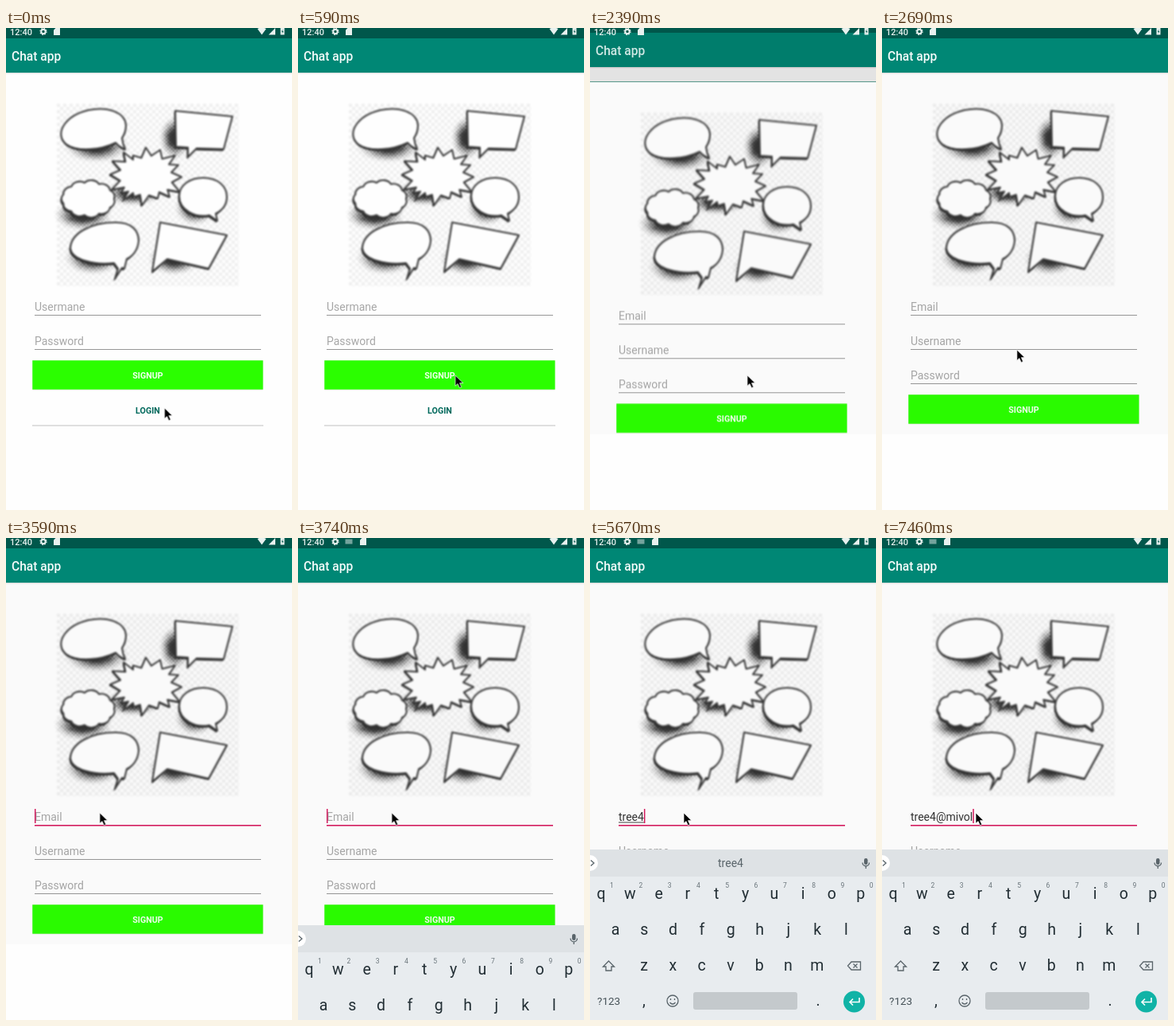
These frames come from a looping animation (360x605 px, 8000 ms). An HTML page:

```html
<!DOCTYPE html>
<html lang="en">
<head>
<meta charset="utf-8">
<title>Chat app</title>
<style>
  html, body { margin: 0; width: 100%; height: 100%; overflow: hidden; background: #fff; }
  svg { display: block; width: 360px; height: 605px; font: 14px Roboto, sans-serif; }
  .mid { text-anchor: middle; }
  .button { font-size: 10.7px; font-weight: 600; text-anchor: middle; }
  .hint { fill: #a8a8a8; }
  .key { font-size: 19.5px; text-anchor: middle; fill: #222e34; }
  .num { font-size: 8.5px; text-anchor: middle; fill: #69747a; }
  .line { fill: none; stroke: #59646a; stroke-width: 1.3; }
  #content { mix-blend-mode: multiply; }
  #picture { filter: blur(.8px); }
</style>
</head>
<body>
<svg viewBox="0 0 360 605">
  <defs>
    <pattern id="checker" x="64" y="95" width="8" height="8" patternUnits="userSpaceOnUse">
      <path fill="#fff" d="M0 0h8v8h-8z"/>
      <path fill="#f0f0f0" d="M0 0h4v4h-4zM4 4h4v4h-4z"/>
    </pattern>
    <linearGradient id="drop" x2="0" y2="1">
      <stop stop-opacity=".16"/><stop offset="1" stop-opacity="0"/>
    </linearGradient>
  </defs>

  <rect width="360" height="605" fill="#fefefe"/>
  <rect id="page" width="360" height="510" fill="#fafafa"/>
  <g id="content">
    <g id="picture"><rect x="64" y="95" width="229" height="229" fill="url(#checker)"/></g>
    <g id="login"></g>
    <g id="signup"></g>
  </g>
  <g id="band">
    <rect y="49" width="360" height="18" fill="#e3e3e3"/>
    <rect y="67" width="360" height="1" fill="#57978a"/>
  </g>

  <rect width="360" height="14" fill="#00574b"/>
  <g id="bar">
    <rect id="barFill" y="13" width="360" height="43"/>
    <rect y="56" width="360" height="2" fill="url(#drop)"/>
    <text id="title" x="7" y="41" font-size="15.6" font-weight="500" fill="#f4fbfa">Chat app</text>
  </g>
  <g fill="#e8f1ef">
    <text x="5" y="8.5" font-size="11" font-weight="500">12:40</text>
    <circle cx="47" cy="4.5" r="2.7" fill="none" stroke="#e8f1ef" stroke-width="2"/>
    <circle cx="47" cy="4.5" r="4" fill="none" stroke="#e8f1ef" stroke-width="1.3" stroke-dasharray="1.57 1.57"/>
    <path id="card" d="M62.5 0H68V9H60V2.5Z"/>
    <path id="imeIcon" opacity=".5" d="M59.5 1.5h9v6h-9z"/>
    <path d="M316.5 1Q322 -2 327.5 1L322 8.5ZM339 0V8.5H330.5ZM345.5 0H350.5V8.5H345.5Z"/>
    <path d="M348.5 1.5L346.8 4.8H348L347.5 7.3L349.4 4H348.2Z" fill="#00574b"/>
  </g>

  <g id="keyboard">
    <rect y="391" width="360" height="214" fill="#e8ecef"/>
    <rect y="391" width="360" height="34" fill="#dee2e5"/>
    <circle cx="0" cy="408" r="10" fill="#fff"/>
    <path class="line" d="M1 404.5l4 3.500-4 3.500"/>
    <rect x="345" y="402" width="4.500" height="8" rx="2.250" fill="#59646a"/>
    <path class="line" d="M343 407.500a4.250 4.250 0 0 0 8.500 0M347.250 412v3"/>
    <g id="words" class="mid" fill="#59646a">
      <path id="splits" stroke="#c9ced1" d="M122.500 400v16M233.500 400v16"/>
      <text x="72" y="413"></text><text x="177" y="413"></text><text x="282" y="413"></text>
    </g>
    <g id="keys"></g>
    <path class="line" d="M23.500 531l7 7h-3.500v5h-7v-5h-3.500z"/>
    <path class="line" d="M329 532h11.500v10H329l-4.500-5zM331.500 534.500l5 5m0-5l-5 5"/>
    <text x="9" y="586" font-size="13.500" fill="#455157">?123</text>
    <circle class="line" cx="104" cy="581" r="7"/>
    <path class="line" d="M101.500 578v2M106.500 578v2M100.500 583q3.500 4 7 0"/>
    <rect x="130" y="570" width="131" height="22" rx="3" fill="#c4c9cc"/>
    <circle cx="332.500" cy="582" r="13.500" fill="#10b3a6"/>
    <path d="M339 577v5.500h-12m4-4l-4 4 4 4" fill="none" stroke="#fff" stroke-width="1.600"/>
  </g>

  <g id="cursor">
    <path transform="scale(.92)" d="M0 0V14.500L3.300 11.500L5.800 17L8.500 16L6 10.500H10.800Z" stroke="#fff" stroke-width=".8"/>
  </g>
</svg>
<script>
const $ = id => document.getElementById(id);
const add = (id, markup) => $(id).insertAdjacentHTML('beforeend', markup);
const show = (id, on) => $(id).setAttribute('display', on ? 'inline' : 'none');
const move = (id, x, y) => $(id).setAttribute('transform', `translate(${x} ${y})`);

// Halftone shadow: dots shrink away from the centre.
function dots(cx, cy, rx, ry) {
  let d = '';
  for (let j = -ry; j <= ry; j += 2.2)
    for (let i = -rx + (Math.round((j + ry) / 2.2) % 2) * 2.2; i <= rx; i += 4.4) {
      const r = 2.7 * (1 - Math.hypot(i / rx, j / ry));
      if (r > .2) d += `M${cx + i - r} ${cy + j}a${r} ${r} 0 1 0 ${2 * r} 0a${r} ${r} 0 1 0 ${-2 * r} 0`;
    }
  add('picture', `<path fill="#333" d="${d}"/>`);
}

function bubble(d, dx = -1, dy = 2) {
  add('picture', `<path d="${d}" fill="#2c2c2c" stroke="#2c2c2c" transform="translate(${dx} ${dy})"/>
    <path d="${d}" fill="#fff" stroke="#3a3a3a" stroke-width="2.1" stroke-linejoin="round"/>`);
}

function burst(cx, cy, tips) {
  return 'M' + tips.map(([x, y], i) => {
    const [nx, ny] = tips[(i + 1) % tips.length];
    return `${x} ${y}L${cx + ((x + nx) / 2 - cx) * .74} ${cy + ((y + ny) / 2 - cy) * .74}`;
  }).join('L') + 'Z';
}

function cloud(cx, cy, rx, ry, n) {
  let d = '';
  for (let i = 0; i <= n; i++) {
    const a = i / n * 2 * Math.PI;
    const p = `${cx + rx * Math.cos(a)} ${cy + ry * Math.sin(a)}`;
    d += i ? `A11 9 0 0 1 ${p}` : 'M' + p;
  }
  return d + 'Z';
}

dots(114, 148, 44, 23);
dots(213, 138, 22, 30);
dots(160, 207, 38, 18);
dots(97, 235, 40, 21);
dots(238, 226, 28, 24);
dots(110, 288, 40, 24);
dots(212, 290, 36, 22);
bubble('M138 144C120 153 90 156 76 146C60 133 74 110 104 103C128 98 150 106 151 122Q151 131 146 138Q147 146 150 152Q143 150 138 144Z', 0, 1.5);
bubble('M213 104L285 111L274 152L240 151L229 162L229 150L214 149Z');
bubble(burst(177, 186, [[134, 167], [148, 156], [160, 160], [176, 150], [194, 153], [213, 160], [217, 172],
  [221, 187], [219, 206], [206, 212], [191, 214], [171, 223], [161, 212], [147, 217], [145, 207],
  [133, 203], [131, 184]]), -1, 1);
bubble(cloud(103.5, 214.5, 32.5, 20.5, 11));
bubble('M256 235C238 239 218 228 218 211C218 197 232 188 248 188C266 188 278 198 278 212C278 222 272 229 264 233L266 242Z');
bubble('M136 295C112 298 82 291 81 276C82 258 106 244 138 244C158 244 167 254 167 267C166 278 160 286 152 290L149 302L146 301L137 315L141 302Z');
bubble('M194 244L278 260L255 302L203 290L184 306Z', 0, 1.5);

const field = (label, y) => `<text class="hint" x="36" y="${y - 5}">${label}</text>
  <rect x="36" y="${y}" width="285" height="1" fill="#989898"/>`;
const signupButton = y => `<rect x="33.300" y="${y}" width="290.200" height="37.400" fill="#dfe8dc"/>
  <rect x="33.300" y="${y + .3}" width="290.200" height="36.400" fill="#2bff00"/>
  <text class="button" x="178.500" y="${y + 23}" fill="#f4fff2">SIGNUP</text>`;

add('login', field('Usermane', 360) + field('Password', 403) + signupButton(417) +
  `<rect id="press" x="33" y="455" width="291" height="4" fill="url(#drop)"/>
   <rect x="33" y="498" width="291" height="2" fill="#e0e0e0"/>
   <text class="button" x="178.500" y="484" fill="#00695c">LOGIN</text>`);
add('signup', `<g id="email">${field('Email', 360)}</g>` + field('Username', 403) + field('Password', 446) +
  signupButton(460) +
  `<g id="focus">
     <text id="typed" x="36" y="355" fill="#333"></text>
     <rect id="under" x="36" y="356.500" height="1" fill="#444"/>
     <rect x="36" y="360" width="285" height="1.600" fill="#d81b60"/>
     <rect id="caret" y="340" width="1.500" height="18" fill="#d81b60"/>
   </g>`);

const row = (letters, x, y) => [...letters].forEach((c, i) =>
  add('keys', `<text class="key" x="${x + i * 36.3}" y="${y}">${c}</text>`));
row('qwertyuiop', 14, 453);
row('asdfghjkl', 32, 498);
row('zxcvbnm', 68, 543);
row(',', 68, 587);
row('.', 287, 587);
[...'1234567890'].forEach((c, i) =>
  add('keys', `<text class="num" x="${27.5 + i * 36.3}" y="439">${c}</text>`));

// time, text, caret shown, suggestions
const typing = [
  [0, '', 1, []],
  [4490, '', 1, ['t', 'thanks', 'thank']],
  [4640, 't', 1, ['t', 'thanks', 'thank']],
  [4790, 'tre', 1, ['tre', 'tree', 'trees']],
  [4930, 'tree', 1, ['tree', 'tree', 'trees']],
  [5380, 'tree', 0, ['tree', 'tree', 'trees']],
  [5670, 'tree4', 1, ['', 'tree4', '']],
  [6270, 'tree4', 0, ['', 'tree4', '']],
  [6570, 'tree4@', 1, []],
  [7010, 'tree4@m', 1, []],
  [7160, 'tree4@mi', 1, []],
  [7310, 'tree4@miv', 1, []],
  [7460, 'tree4@mivol', 1, []]
];
const slots = document.querySelectorAll('#words text');

// Progress 0..1 in n steps of 150 ms, the first step 150 ms after start.
const steps = (t, start, n) => Math.min(1, Math.max(0, Math.floor((t - start) / 150) / n));
const smooth = k => k * k * (3 - 2 * k);

function draw(t) {
  const opened = t >= 2390, focused = t >= 3440, ime = t >= 3740;
  show('login', !opened);
  show('signup', opened);
  show('page', opened);
  show('press', t >= 1940 && t < 2240);

  const slide = opened ? (1 - steps(t, 2390, 2)) ** 2 : 0;
  move('content', 0, 11.3 * slide);
  move('bar', 0, -7 * slide);
  $('barFill').setAttribute('fill', `rgb(0 ${135 - 10 * slide} ${117 - 9 * slide})`);
  $('title').setAttribute('opacity', 1 - .15 * slide);
  show('band', slide === 1);

  const a = steps(t, 290, 2), b = smooth(steps(t, 2390, 5));
  move('cursor', 199.5 - 1.5 * a - 80 * b, 477 - 41 * a - 91 * b);

  show('keyboard', ime);
  show('imeIcon', ime);
  move('card', ime ? 18 : 0, 0);
  move('keyboard', 0, 214 * (1 - steps(t, 3590, 3)) ** 2);

  const [, text, caret, words] = typing.findLast(s => s[0] <= t);
  show('focus', focused);
  $('email').firstElementChild.setAttribute('display', text ? 'none' : 'inline');
  $('typed').textContent = text;
  const width = text && focused ? $('typed').getComputedTextLength() : 0;
  $('under').setAttribute('width', text.includes('@') ? 0 : width);
  $('caret').setAttribute('x', 36 + width);
  show('caret', caret);
  show('splits', words[0]);
  slots.forEach((slot, i) => slot.textContent = words[i] || '');
  slots[1].setAttribute('font-weight', words[0] ? 700 : 400);
  slots[1].setAttribute('fill', words[0] ? '#1c2429' : '#59646a');
}

const start = performance.now();
function tick() {
  draw((performance.now() - start) % 8000);
  requestAnimationFrame(tick);
}
tick();
</script>
</body>
</html>
```
